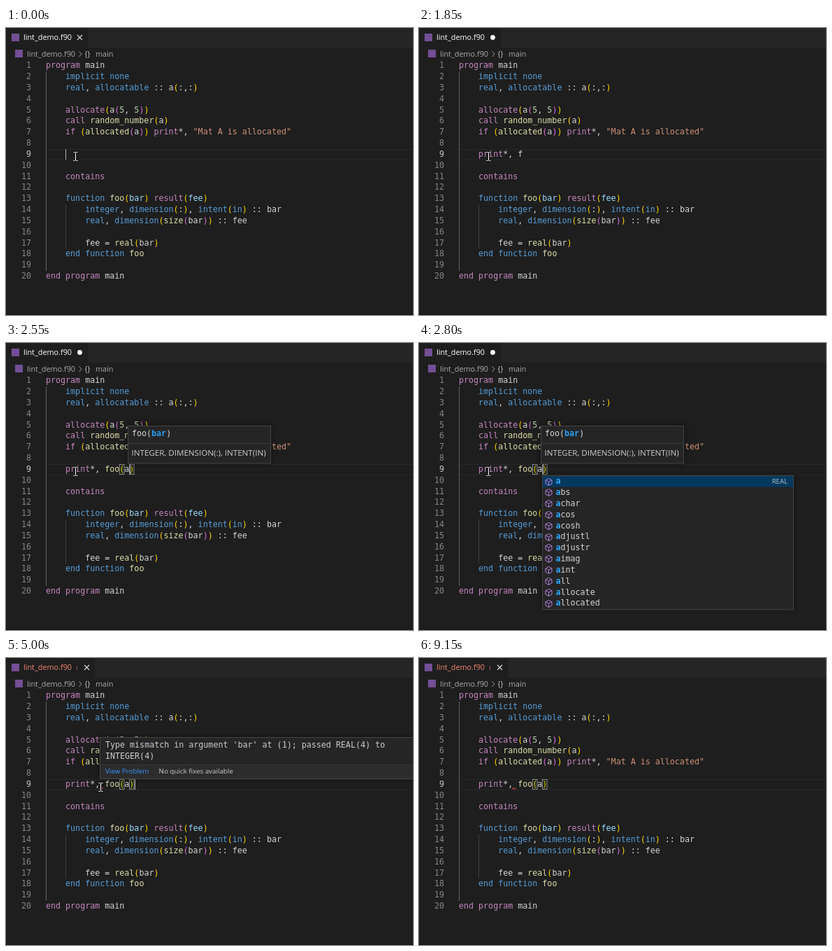
Write an HTML page with a canvas that moves like this. It is 582 by 410 pixels and loops after 9.25 s.

```html
<!DOCTYPE html>
<html lang="en">
<head>
<meta charset="utf-8">
<title>Editor linting demo</title>
<style>
html, body { margin: 0; width: 100%; height: 100%; overflow: hidden; background: #1e1e1e; }
canvas { display: block; }
</style>
</head>
<body>
<canvas id="stage" width="582" height="410"></canvas>
<script>
const ctx = document.getElementById('stage').getContext('2d');
const LOOP = 9250, LEFT = 57, CHAR = 7.02, ROW = 15.83, TOP = 46.33;
const MONO = '11.66px "DejaVu Sans Mono", monospace';
const BOLD = 'bold ' + MONO;
const ui = size => size + 'px "Open Sans", "Noto Sans", sans-serif';
const TEXT = '#d4d4d4';

// A word may carry a colour tag: word@tag
const COLORS = { p: '#c586c0', b: '#569cd6', y: '#dcdcaa', v: '#9cdcfe' };
const BRACKETS = ['#ffd700', '#da70d6', '#179fff'];
const LINES = [
  'program@p main',
  '    implicit@b none@b',
  '    real@b, allocatable@b :: a(:,:)',
  '',
  '    allocate@p(a(5, 5))',
  '    call@p random_number@y(a)',
  '    if@p (allocated@y(a)) print@p*, "Mat A is allocated"',
  '',
  '',
  '',
  '    contains@p',
  '',
  '    function@b foo@y(bar@v) result@p(fee@v)',
  '        integer@b, dimension@b(:), intent@b(in@b) :: bar',
  '        real@b, dimension@b(size@y(bar)) :: fee',
  '',
  '        fee = real@y(bar)',
  '    end@b function@b foo@y',
  '',
  'end@p program@p main'
];

// [time, text on line 9, characters behind the caret]
const PRINT = 'print@p*, ';
const TYPING = [
  [0, '', 0], [100, 'p', 0], [550, 'pr', 0], [600, 'pri', 0], [700, 'prin', 0],
  [800, 'print@p', 0], [1050, 'print@p*', 0], [1250, 'print@p*,', 0], [1450, PRINT, 0],
  [1850, PRINT + 'f', 0], [1950, PRINT + 'fo', 0], [2050, PRINT + 'foo@y', 0],
  [2350, PRINT + 'foo@y()', 1], [2500, PRINT + 'foo@y(a)', 1], [2850, PRINT + 'foo@y(a)', 0]
];
const POPUPS = [
  { from: 150, to: 1050, detail: 'STATEMENT', words: 'print private precision parity pack parameter pause pointer popcnt poppar present procedure' },
  { from: 1900, to: 2350, detail: 'FUNCTION', words: 'foo floor format forall fraction flush final function fnum fseek fstat ftell' },
  { from: 2600, to: 2850, detail: 'REAL', words: 'a abs achar acos acosh adjustl adjustr aimag aint all allocate allocated' }
];
const CARET_OFF = [
  [3450, 3700], [4100, 4450], [4650, 5000], [5400, 5700], [6150, 6450],
  [6900, 7200], [7600, 8000], [8400, 8700], [9150, LOOP]
];
const MOUSE = [
  [0, 99, 183], [3600, 99, 183], [3800, 132, 186], [4050, 132, 186],
  [4200, 135, 184], [7350, 135, 184], [7550, 600, 350], [LOOP, 600, 350]
];

const within = (t, from, to) => t >= from && t < to;
const colX = col => LEFT + CHAR * col;
const rowY = line => TOP + ROW * (line - 1);

function rect(x, y, w, h, color) {
  ctx.fillStyle = color;
  ctx.fillRect(x, y, w, h);
}

function text(str, x, y, color, font, align = 'left') {
  ctx.font = font;
  ctx.fillStyle = color;
  ctx.textAlign = align;
  ctx.fillText(str, x, y);
}

function stroke(points, color, width = 1) {
  ctx.beginPath();
  points.forEach(([x, y], i) => i ? ctx.lineTo(x, y) : ctx.moveTo(x, y));
  ctx.strokeStyle = color;
  ctx.lineWidth = width;
  ctx.stroke();
}

function panel(x, y, w, h) {
  ctx.save();
  ctx.shadowColor = 'rgba(0,0,0,.5)';
  ctx.shadowBlur = 7;
  rect(x, y, w, h, '#454545');
  ctx.restore();
  rect(x + 1, y + 1, w - 2, h - 2, '#252526');
}

function drawCode(source, line, col = 0) {
  const y = rowY(line) + 10.9;
  let depth = 0;
  for (const [part, quoted, word, tag] of source.matchAll(/("[^"]*")|(\w+)(?:@(\w))?|[^\w]/g)) {
    const shown = quoted || word || part;
    let color = TEXT;
    if (quoted) color = '#ce9178';
    else if (tag) color = COLORS[tag];
    else if (/^\d/.test(shown)) color = '#b5cea8';
    else if (shown === '(') color = BRACKETS[depth++ % 3];
    else if (shown === ')') color = BRACKETS[--depth % 3];
    if (shown !== ' ') text(shown, colX(col), y, color, MONO);
    col += shown.length;
  }
}

function cross(x, y, color) {
  stroke([[x - 3.5, y - 3.5], [x + 3.5, y + 3.5]], color, 1.1);
  stroke([[x - 3.5, y + 3.5], [x + 3.5, y - 3.5]], color, 1.1);
}

function drawHeader(t) {
  const failed = t >= 3150;
  const dirty = within(t, 100, 3050);
  rect(0, 0, 582, 28, '#252526');
  rect(0, 0, failed ? 127 : 117, 28, '#1e1e1e');
  rect(8, 8, 11, 11, '#734f96');
  text('lint_demo.f90', 25, 17.2, failed ? '#f48771' : '#ffffff', ui(10.83));
  if (failed) text('1', 99, 17, '#c26d5d', ui(8));
  if (dirty) {
    ctx.beginPath();
    ctx.arc(105.5, 13.5, 3.4, 0, 7);
    ctx.fillStyle = '#ffffff';
    ctx.fill();
  } else {
    cross(failed ? 115.5 : 105.5, 13.5, '#e0e0e0');
  }
  rect(13, 31, 11, 11, '#734f96');
  text('lint_demo.f90', 30, 41, '#a9a9a9', ui(10.83));
  stroke([[104.5, 33.5], [108, 37.2], [104.5, 41]], '#a0a0a0');
  text('{}', 112.5, 40.5, '#c5c5c5', ui(10.5));
  text('main', 128, 41, '#a9a9a9', ui(10.83));
}

function drawEditor(step) {
  rect(LEFT, 173, 525, 1, '#292929');
  rect(LEFT, 188, 525, 1, '#292929');
  rect(LEFT, rowY(2), 1, ROW * 18, '#646464');
  rect(85, rowY(14), 1, ROW * 4, '#404040');
  LINES.forEach((source, i) => {
    const line = i + 1;
    text(line, 36, rowY(line) + 10.9, line === 9 ? '#c6c6c6' : '#858585', MONO, 'right');
    drawCode(source, line);
  });
  drawCode(step[1], 9, 4);
}

function drawMatch(col) {
  const x = Math.round(colX(col)) + .5;
  ctx.strokeStyle = '#888888';
  ctx.lineWidth = 1;
  ctx.fillStyle = 'rgba(0,100,0,.1)';
  ctx.fillRect(x, 173.5, 6.5, 14);
  ctx.strokeRect(x, 173.5, 6.5, 14);
}

function drawSquiggle() {
  const points = [];
  for (let x = 0; x <= 7; x++) points.push([133 + x * .8, 186.5 + Math.cos(x * Math.PI / 2) * 1.2]);
  stroke(points, '#f14c4c');
}

function drawIcon(word, x, y) {
  if (word === 'print') {
    stroke([[x - 4.5, y + 4], [x - 4.5, y - 4.5], [x + 4.5, y - 4.5], [x + 4.5, y + 4]], TEXT);
    for (let i = -4; i <= 4; i += 2) rect(x + i - .5, y + 4, 1, 1, TEXT);
  } else if (word === 'private') {
    [[-5, 4], [-5, 10], [-5, 5], [-5, 8]].forEach(([dx, w], i) => rect(x + dx, y - 4 + i * 2.6, w, 1, '#c5c5c5'));
    rect(x + 1, y - 4, 4, 1, '#c5c5c5');
  } else {
    const purple = '#b180d7';
    stroke([[x, y - 5], [x + 4.5, y - 2.7], [x + 4.5, y + 2.5], [x, y + 5],
      [x - 4.5, y + 2.5], [x - 4.5, y - 2.7], [x, y - 5]], purple);
    stroke([[x - 4.5, y - 2.7], [x, y - .3], [x + 4.5, y - 2.7]], purple);
    stroke([[x, y - .3], [x, y + 5]], purple);
  }
}

// Positions of the typed letters inside a word, or null
function fuzzy(word, typed) {
  const hits = [];
  let from = 0;
  for (const letter of typed) {
    const at = word.indexOf(letter, from);
    if (at < 0) return null;
    hits.push(at);
    from = at + 1;
  }
  return hits;
}

function drawPopup({ words, detail }, typed, x) {
  const items = words.split(' ').map(word => [word, fuzzy(word, typed)]).filter(item => item[1]);
  const y = 189;
  panel(x, y, 360, items.length * ROW + 2.5);
  rect(x + 1, y + 1, 358, ROW, '#04395e');
  items.forEach(([word, hits], row) => {
    const top = y + 1 + row * ROW;
    drawIcon(word, Math.round(x + 9) + .5, Math.round(top + 7.5) + .5);
    [...word].forEach((letter, i) => {
      const hit = hits.includes(i);
      text(letter, x + 19.5 + i * CHAR, top + 11.3, hit ? '#2aaaff' : row ? TEXT : '#ffffff', hit ? BOLD : MONO);
    });
  });
  text(detail, x + 351, y + 11.8, '#b4c4cf', ui(9.6), 'right');
}

function drawHint() {
  panel(174, 118, 205, 54.5);
  text('foo(', 180, 133.2, TEXT, MONO);
  text('bar', 180 + 4 * CHAR, 133.2, '#2a9df4', BOLD);
  text(')', 180 + 7 * CHAR, 133.2, TEXT, MONO);
  rect(175, 143, 203, 1, '#3c3c3d');
  text('INTEGER, DIMENSION(:), INTENT(IN)', 179.5, 161, '#cccccc', ui(11.6));
}

function drawHover() {
  panel(134, 113, 460, 60);
  rect(135, 152, 447, 20, '#2c2c2d');
  rect(135, 152, 447, 1, '#363637');
  text("Type mismatch in argument 'bar' at (1); passed REAL(4) to", 142, 128.3, '#cccccc', MONO);
  text('INTEGER(4)', 142, 144, '#cccccc', MONO);
  text('View Problem', 142, 165, '#3794ff', ui(9.8));
  text('No quick fixes available', 218.5, 165, '#cccccc', ui(9.8));
}

function drawMouse(t) {
  const i = MOUSE.findIndex(key => key[0] > t);
  const [t0, x0, y0] = MOUSE[i - 1], [t1, x1, y1] = MOUSE[i];
  const k = (t - t0) / (t1 - t0);
  const x = Math.round(x0 + (x1 - x0) * k) + .5;
  const y = Math.round(y0 + (y1 - y0) * k) + .5;
  for (const [color, width] of [['#000000', 3], ['#ffffff', 1.2]]) {
    stroke([[x, y - 6], [x, y + 6]], color, width);
    for (const dy of [-6, 6]) {
      stroke([[x - 3, y + dy], [x - 1, y + dy]], color, width);
      stroke([[x + 1, y + dy], [x + 3, y + dy]], color, width);
    }
  }
}

function draw(t) {
  const step = TYPING.filter(s => s[0] <= t).pop();
  const plain = step[1].replace(/@\w/g, '');
  const caret = 4 + plain.length - step[2];
  const popup = POPUPS.find(p => within(t, p.from, p.to));
  const lagging = step[0] > 0 && t - step[0] < 50;

  rect(0, 0, 582, 410, '#1e1e1e');
  drawHeader(t);
  drawEditor(step);
  if (t >= 2350) {
    drawMatch(15);
    drawMatch(plain.length + 3);
  }
  if (t >= 3150) drawSquiggle();
  if (!lagging && !CARET_OFF.some(([from, to]) => within(t, from, to))) {
    rect(Math.round(colX(caret) + .2), 173, 1, 15, '#aeafad');
  }
  rect(0, 408, 582, 2, '#18181b');
  if (within(t, 2400, 3450)) drawHint();
  if (popup) {
    const typed = plain.slice(0, plain.length - step[2]).match(/\w*$/)[0];
    drawPopup(popup, typed, Math.round(colX(caret)));
  }
  if (within(t, 4150, 7400)) drawHover();
  drawMouse(t);
}

const start = performance.now();
function tick() {
  draw((performance.now() - start) % LOOP);
  requestAnimationFrame(tick);
}
tick();
</script>
</body>
</html>
```
